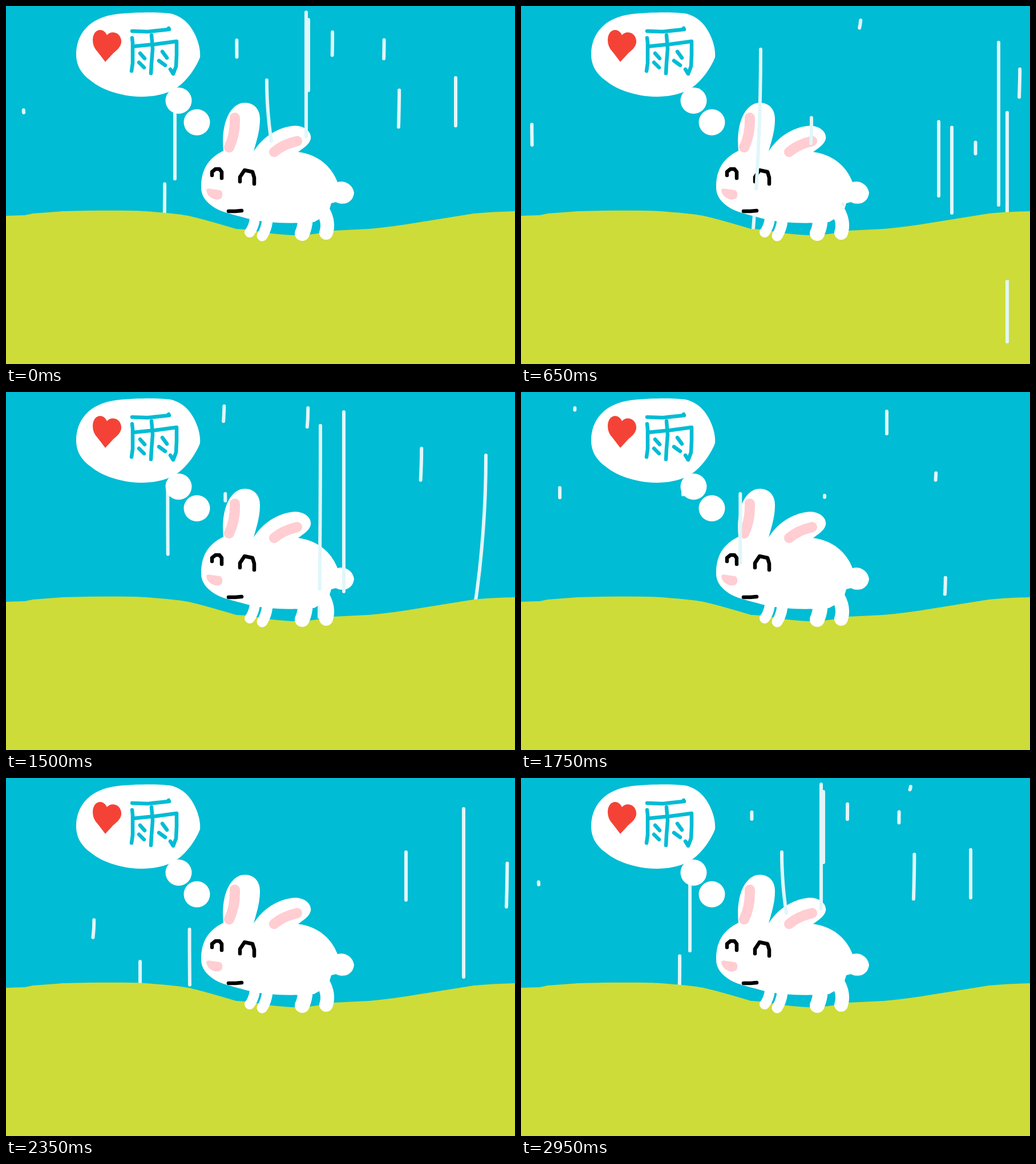
These frames come from a looping animation (892x628 px, 3000 ms). An HTML page:

```html
<!DOCTYPE html>
<html lang="en">
<head>
<meta charset="utf-8">
<title>Rabbit in the rain</title>
<style>
  html, body { margin: 0; width: 100%; height: 100%; overflow: hidden; background: #00bcd4; }
  svg { display: block; width: 892px; height: 628px; }
  .line { fill: none; stroke-linecap: round; stroke-linejoin: round; }
</style>
</head>
<body>
<svg viewBox="0 0 892 628">
  <rect width="892" height="628" fill="#00bcd4"/>
  <rect y="450" width="892" height="178" fill="#cddc39"/>

  <!-- body, ears and tail -->
  <path fill="#fff" d="M342 318C342 290 352 268 381 254C377 215 387 180 410 171C430 166 446 178 445 200C445 220 438 240 434 255
    C450 230 475 213 505 210C525 210 536 222 534 233C532 243 520 250 512 256C545 260 570 280 581 309
    C592 305 608 312 610 328C608 345 592 351 578 344L570 346L567 356C555 372 545 379 525 380
    C490 382 450 380 420 372C400 366 375 362 360 350C347 340 342 330 342 318Z"/>
  <g class="line" stroke="#ffcdd2" stroke-width="18">
    <path d="M401 196Q402 225 391 248"/>
    <path d="M470 256Q485 243 510 237"/>
  </g>
  <g class="line" stroke="#000" stroke-width="6.5">
    <path d="M361 297V291L367 286H374L378 291V302"/>
    <path d="M410 308V300L418 288L432 291L435 301V312"/>
  </g>

  <path id="rain" class="line" stroke="#e0f7fa" stroke-width="6"/>

  <!-- belly, nose, mouth, hill and legs hide the rain -->
  <path fill="#fff" d="M395 323H425L567 352L555 370L540 379L470 378L415 369L392 361Z"/>
  <path fill="#ffcdd2" d="M351 323Q352 319 360 321L375 323Q380 325 379 333Q378 341 365 339Q352 334 351 323Z"/>
  <path class="line" stroke="#000" stroke-width="6.5" d="M390 360H402L413 359"/>
  <path fill="#cddc39" d="M0 368L33 367L47 364L100 360C150 359 200 358 245 360Q300 364 320 368Q350 375 403 391L420 392L465 399
    Q500 403 520 402Q545 400 575 394L636 391Q680 387 720 380L820 364Q850 361 892 360V479L851 481L698 475L640 469H0Z"/>
  <g class="line" stroke="#fff">
    <path stroke-width="18" d="M436 374Q434 388 427 397"/>
    <path stroke-width="19" d="M458 377Q456 392 449 403"/>
    <path stroke-width="26" d="M525 372Q524 388 519 399"/>
    <path stroke-width="24" d="M556 360Q567 380 561 398"/>
  </g>

  <!-- thought bubble -->
  <path fill="#fff" d="M123 85C123 50 145 20 195 14C240 10 275 11 292 14C310 20 320 30 328 44C338 62 341 78 340 90
    C333 108 318 130 300 143C280 156 255 160 230 159C200 157 170 148 150 132C130 118 123 102 123 85Z"/>
  <circle cx="302.5" cy="166" r="23" fill="#fff"/>
  <circle cx="334.5" cy="204" r="23" fill="#fff"/>
  <path fill="#f44336" d="M174 98L161 81Q152 72 152 60C152 40 170 36 177 51C184 42 201 46 202 61C203 73 190 80 186 85Z"/>
  <g class="line" stroke="#00bcd4" stroke-width="6.5">
    <path d="M221 44L248 45L286 41L285 39"/>
    <path d="M221 56L222 65V100L220 114M222 71L262 67L299 62V85L298 106L293 119L288 111"/>
    <path d="M255 51L257 75L255 100L254 118"/>
    <path d="M235 83L243 92M233 99L242 108M274 80L282 91M268 96L279 104"/>
  </g>
</svg>
<script>
const FRAMES = 60, STEP = 50;
const rain = document.getElementById("rain");
const drops = [];

// Distance drawn after k frames of an accelerating stroke, and its inverse.
const reach = k => k <= 0 ? 0 : 6 * k + 1.2 * k * k;
const frames = d => (Math.sqrt(36 + 4.8 * d) - 6) / 2.4;

let seed = 90210;
const rnd = () => (seed = seed * 16807 % 2147483647) / 2147483647;

// A stroke is whole at the given frame, then vanishes from the top as fast as it was drawn.
function addDrop(whole, x, top, bottom, lean = 0) {
  const len = bottom - top, full = frames(len);
  const speed = Math.max(1, full / 5), delay = full / speed + 1;
  drops.push({ x, top, len, lean, full, speed, delay, start: whole - delay });
}

// Long strokes
addDrop(0, 296, 187, 303);
addDrop(0, 457, 130, 237, 8);
addDrop(0, 526, 11, 229);
addDrop(0, 530, 24, 148);
addDrop(0, 788, 126, 210);
addDrop(13, 420, 76, 391, -13);
addDrop(13, 732, 203, 333);
addDrop(13, 755, 213, 363);
addDrop(13, 837, 64, 349);
addDrop(13, 852, 187, 589);
addDrop(30, 551, 59, 395, -2);
addDrop(30, 592, 35, 350);
addDrop(30, 841, 111, 380, -20);
addDrop(40, 68, 168, 352, 6);
addDrop(40, 284, 170, 261, -6);
addDrop(40, 641, 34, 560, 3);
addDrop(47, 235, 322, 370);
addDrop(47, 701, 130, 214);
addDrop(47, 802, 54, 349);

// Short strokes and dots, scattered evenly over the loop
for (let i = 0; i < FRAMES; i++) {
  const top = 8 + 350 * rnd() ** 2;
  addDrop(i, 10 + 870 * rnd(), top, top + 4 + 140 * rnd() ** 3, 4 * rnd() - 3);
}

function streak(d, frame) {
  const age = ((frame - d.start) % FRAMES + FRAMES) % FRAMES;
  const tail = d.speed * (age - d.delay);
  if (tail >= d.full) return "";
  const from = reach(tail), to = Math.min(d.len, reach(d.speed * age));
  const point = s => `${(d.x + d.lean * (s / d.len) ** 2).toFixed(1)} ${(d.top + s).toFixed(1)}`;
  let path = "M" + point(from);
  for (let i = 1; i <= 8; i++) path += "L" + point(from + (to - from) * i / 8);
  return path;
}

function draw() {
  const frame = Math.floor(performance.now() / STEP) % FRAMES;
  rain.setAttribute("d", drops.map(d => streak(d, frame)).join(""));
  requestAnimationFrame(draw);
}
draw();
</script>
</body>
</html>
```
